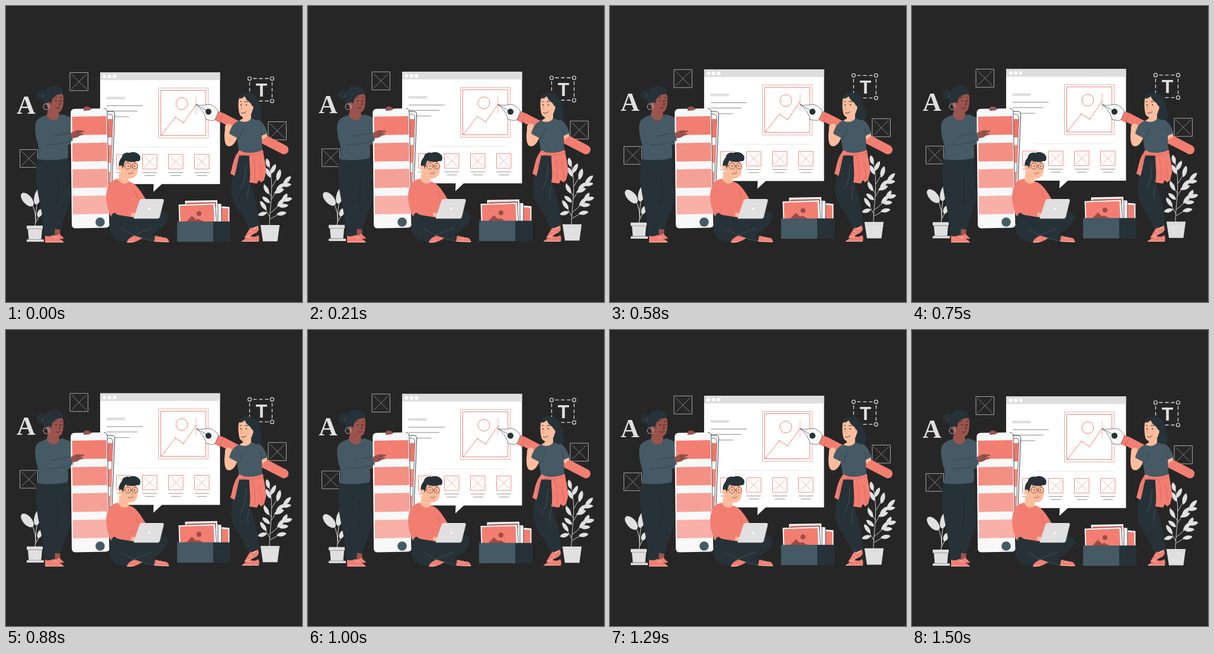
Animation of 500x500 px, one loop 1.54 s. Source, as an HTML page with a canvas:

```html
<!DOCTYPE html>
<html lang="en">
<head>
<meta charset="utf-8">
<title>Design team</title>
<style>
html, body { margin: 0; width: 100%; height: 100%; overflow: hidden; background: #262626; }
canvas { display: block; width: 500px; height: 500px; }
</style>
</head>
<body>
<canvas id="stage" width="500" height="500"></canvas>
<script>
const ctx = document.getElementById('stage').getContext('2d');
const LOOP = 1540, LIFT = 5.8, LEAD = 25;
const BG = '#262626', CORAL = '#f27e71', DEEP = '#d9675c', NAVY = '#263238', SLATE = '#455a64';
const GREY = '#e0e0e0', PALE = '#f8f8f8', WHITE = '#ffffff', TAN = '#fdbd9d', BROWN = '#9a544d', INK = '#1c262b';

const fill = (color, d) => { ctx.fillStyle = color; ctx.fill(new Path2D(d)); };
const line = (color, width, d) => {
  ctx.strokeStyle = color;
  ctx.lineWidth = width;
  ctx.stroke(new Path2D(d));
};
const rect = (color, x, y, w, h) => { ctx.fillStyle = color; ctx.fillRect(x, y, w, h); };
const oval = (color, x, y, rx, ry = rx, turn = 0) => {
  ctx.fillStyle = color;
  ctx.beginPath();
  ctx.ellipse(x, y, rx, ry, turn, 0, Math.PI * 2);
  ctx.fill();
};
const ring = (color, width, x, y, r) => {
  ctx.strokeStyle = color;
  ctx.lineWidth = width;
  ctx.beginPath();
  ctx.arc(x, y, r, 0, Math.PI * 2);
  ctx.stroke();
};
const text = (str, font, x, y) => {
  ctx.font = font;
  ctx.fillStyle = GREY;
  ctx.textAlign = 'center';
  ctx.fillText(str, x, y);
};

function crossBox(color, x, y, size, width = 0.9) {
  const a = 3, b = size - 3;
  line(color, width, `M${x} ${y}h${size}v${size}h${-size}z`);
  line(color, width * 0.75, `M${x + a} ${y + a}L${x + b} ${y + b}M${x + b} ${y + a}L${x + a} ${y + b}`);
}

// A pointed leaf growing from (x, y) in the given direction, in degrees.
function leaf(x, y, length, width, degrees) {
  ctx.save();
  ctx.translate(x, y);
  ctx.rotate(degrees * Math.PI / 180);
  fill(GREY, `M0 0C${length * 0.3} ${-width} ${length * 0.8} ${-width * 0.8} ${length} 0` +
    `C${length * 0.8} ${width * 0.8} ${length * 0.3} ${width} 0 0`);
  ctx.restore();
}

function drawWindow() {
  rect(WHITE, 159, 112.2, 202.5, 188.6);
  fill(WHITE, 'M249.5 300L249 314L264 300z');
  rect('#dedede', 159, 112.2, 202.5, 13);
  for (const x of [166.5, 175, 183.5]) oval(WHITE, x, 119, 3);

  rect('#dedede', 169.5, 153.3, 31.5, 4.4);
  line('#6b6b6b', 0.8, 'M170 168.5H231M170 177.5H222M170 187H208');
  line('#dddddd', 0.7, 'M204 238.6H341');

  line('#d99b94', 0.8, 'M257.5 138.6h84v84.4h-84z');
  line(CORAL, 1, 'M261.3 142.5h76.4v76.2h-76.4z');
  ring(CORAL, 1, 297, 165, 10);
  line(CORAL, 1, 'M262.5 218L286 188L300 197L321 167');
  line(CORAL, 0.6, 'M321 153V183');
  for (const [x, y] of [[263, 217.5], [286, 188], [300, 197], [321, 167]]) oval(CORAL, x, y, 0.9);

  for (let i = 0; i < 4; i++) {
    const x = 186.5 + i * 44;
    crossBox(CORAL, x, 250.8, 24.5, 0.9);
    line('#777777', 0.8, `M${x} 281.4h24.5M${x + 4} 286.5h17`);
  }
}

function drawSymbols() {
  crossBox('#b5b5b5', 108, 112.5, 30.5);
  crossBox('#b5b5b5', 23.5, 242.5, 30);
  crossBox('#b5b5b5', 443, 195.5, 30.5);
  text('A', 'bold 44px "Liberation Serif", serif', 33.8, 182.3);

  ctx.setLineDash([6, 4]);
  ctx.lineDashOffset = 4;
  line(GREY, 1.3, 'M411.5 122.5H449.5M449.5 122.5V160.5M411.5 160.5H449.5M411.5 122.5V160.5');
  ctx.setLineDash([]);
  for (const [x, y] of [[411.5, 122.5], [449.5, 122.5], [449.5, 160.5]]) {
    oval(BG, x, y, 3);
    ring(GREY, 1.2, x, y, 3);
  }
  text('T', 'bold 32px "Liberation Sans", sans-serif', 431.5, 153);
}

function drawPlants() {
  line(GREY, 1, 'M49 372C52 356 48 344 44 335M50 362Q50 344 53 332M50 366L57 353');
  oval(GREY, 36, 327, 14, 7.5, 0.84);
  oval(GREY, 54, 321.5, 14, 6, -1.3);
  oval(GREY, 57, 350, 7, 4, -1.2);
  rect(GREY, 35, 371, 27, 5.5);
  fill(GREY, 'M37 377H61L59.5 394H38.5z');
  rect(GREY, 35, 394.5, 29, 3.7);
  line('#bdbdbd', 0.6, 'M36 376.7H62M36 394.2H62');

  line(GREY, 0.9, 'M445 371C445 340 454 306 444 266M446 350Q460 340 476 320M448 327Q462 302 478 296' +
    'M446 357Q436 340 431 330M448 322Q440 308 436 300M446 360Q458 352 468 350M449 306Q456 294 460 288');
  const leaves = [
    [444, 273, 16, 5, -103], [447, 284, 19, 5, -63], [447, 290, 18, 5, -116],
    [458, 295, 20, 5.5, -75], [456, 312, 19, 5, -42], [468, 301, 19, 5, -45],
    [464, 303, 18, 5, -5], [453, 316, 18, 5, -22], [466, 332, 18, 5, -60],
    [468, 329, 16, 5, -15], [458, 339, 20, 5, -49], [460, 338, 17, 5, -4],
    [457, 352, 17, 5, -10], [440, 345, 19, 5, -124], [441, 349, 16, 5, 165],
    [444, 318, 18, 5, -118], [446, 333, 17, 5, -140]
  ];
  for (const shape of leaves) leaf(...shape);
  fill(GREY, 'M429.8 370H462.2L458.5 397.6H434z');
  line('#c8c8c8', 0.6, 'M431 374H461');
}

function drawPhotoBox() {
  fill(PALE, 'M361 338L377.5 339.5V366H361z');
  fill(CORAL, 'M363 341L375.5 342V366H363z');
  fill(PALE, 'M353 333.4L364 334.5V366H353z');
  line(NAVY, 0.8, 'M358 333.5V366M364 334.5V366');
  fill(PALE, 'M302.5 329L357 328V366H303z');
  fill(CORAL, 'M305 332L355 331V340H305z');
  fill(PALE, 'M291.5 335.2L353.5 333L356 366H292.5z');
  fill(CORAL, 'M293.5 337.4L350.5 335.6L352 366H294.5z');
  line(NAVY, 0.7, 'M291.5 335L353.5 332.7L355.5 364');
  oval('#9b4c46', 326, 350.6, 4.2);
  fill('#9b4c46', 'M304 365L314 354.5L321 361L325 359.5L335 365z');
  rect(SLATE, 289, 364, 61, 34.3);
  rect(NAVY, 350, 364, 29, 34.3);
}

function drawPen() {
  ctx.lineCap = 'round';
  line(CORAL, 15.6, 'M364 188L469.5 242.6');
  ctx.lineCap = 'butt';
  fill(CORAL, 'M358.5 177.5L369 182L361 197L352 192.5z');
  line(DEEP, 1, 'M367.5 181L360.5 196');
  const nib = 'M321 166.5C333 170 342 164 348 167.5C355 172 360 176 358 181L353.5 191C351 195 344 193 338 191.5C335 180 329 173 321 166.5z';
  fill(PALE, nib);
  line(NAVY, 0.6, nib + 'M321 166.5L340 177');
  oval(NAVY, 342, 178.6, 5.1);
}

function drawLeftWoman() {
  fill(BROWN, 'M79 375L92 375L91 389L78 390z');
  fill(CORAL, 'M80 387C85 389 88 386 90 384C92 388 96 389 98 393L80 394z');
  fill(NAVY, 'M54 254H105C109 280 104 294 109 318C108 340 98 354 92 378L80 376C80 358 86 342 86 330L82 389H64.5C64 354 55 330 52 302C50 285 51 270 54 254z');
  line(INK, 0.8, 'M86 285C90 300 88 318 86 335');
  fill(CORAL, 'M66 388C73 391 78 387 81 387C85 392 94 393 98 399.5H66z');
  line('#f8d6d2', 0.8, 'M66 398.6H97M80 391L85 388.5M83 393L88 390.5');

  fill(SLATE, 'M70 184C80 190 88 186 94 183C103 185 109 188 114 192V232L104 235C106 245 105 254 104 257C88 261 69 261 54 259C56 246 56 237 52 227C49 214 48 202 51 195C56 188 63 186 70 184z');
  fill(BROWN, 'M72 170L89 176L90 185C87 196 73 196 69 184z');

  oval(NAVY, 59, 149.5, 7.5, 8.2, 0.5);
  oval(CORAL, 64, 151, 1.8, 4, 0.4);
  fill(BROWN, 'M73 160C76 150 83 146 89 146C95 146 97 150 97 157C97 167 96 174 92 178C87 182 78 179 74 173z');
  fill(NAVY, 'M71 172C65 168 62 164 62 156C62 143 71 135 81 135C91 134 97 141 96.5 149C88 148 81 152 78 158C77 163 76 166 74 168z');
  oval(BROWN, 72.5, 167.5, 4, 5);
  ring(GREY, 0.8, 68, 170, 5);
  line('#42231f', 0.9, 'M81 155Q84 153 86 154M91 154L95 155M90 159L92 167L89 167M84 172Q89 174 92 171');
  oval('#2b1b1a', 84.5, 160, 0.9, 1.3);
  oval('#2b1b1a', 93.5, 160, 0.8, 1.2);
}

function drawSwatchCards() {
  fill(PALE, 'M165 178H178Q184 178 183.7 184L177 350L160 372z');
  line(NAVY, 0.9, 'M169 178H178Q184 178 183.7 184L177 350');
  line(NAVY, 0.7, 'M172 183Q181 181 180.5 190L174 360');
  fill('#e9776b', 'M172 191H180.3L179.6 222H172z');
  fill('#ef887c', 'M172 235H179.5L178.2 265H172z');
  fill('#f3988e', 'M172 280H177.7L176.4 310H172z');

  fill(PALE, 'M116 173.8L165 173Q170.8 173 171 179L174.8 368Q175 374.4 168 374.6L118 375.4Q111.3 375.4 111.1 369.4L109.2 181Q109.2 174 116 173.8z');
  line(NAVY, 0.8, 'M165 173Q170.8 173 171 179L174.8 368');
  fill('#f27e71', 'M111.6 187L169.5 186L170.2 217.2L112 218z');
  fill('#f48f84', 'M112 231.7L170.4 230.7L171 262L112.3 262.8z');
  fill('#f6a198', 'M112.4 276L171.3 275L172 306.5L112.7 307.5z');
  fill('#f8b0a9', 'M112.8 321L172.2 320L173 351L113 352z');
  oval(SLATE, 159, 365, 7.8);

  fill(BROWN, 'M131 173C132 169 138 169 141 171L145 174L140 176.5L131 177z');
  fill(SLATE, 'M59 222C73 219 92 217 109 214L113 226C102 231 80 235 66 234C59 234 55 228 59 222z');
  line('#2f4049', 0.8, 'M78 220L109 214M66 234Q90 235 113 227');
  fill(BROWN, 'M109 215C115 211 120 209 125 210L132 210.5Q133 213 129 213.5L124 214L131 216Q130 219 125 218.5Q121 223 112 223.5z');
  line('#5b302c', 0.6, 'M118 213L127 213.5M119 217L126 218');
}

function drawMan() {
  fill(CORAL, 'M182 294C190 290 201 293 209 297C219 300 225 308 237 328L216 358L178 357C172 345 166 325 171 309C173 301 177 296 182 294z');
  line(DEEP, 0.9, 'M186 320C187 333 193 343 199 348M218 312L223 326');
  fill(TAN, 'M192 279L207 289L207 297C202 302 194 301 190 293z');
  fill(TAN, 'M194 267C197 259 207 256 217 260C223 263 224 272 222 281C220 289 213 293 206 291C200 289 195 283 194 278z');
  fill(NAVY, 'M192 276C189 266 191 261 196 255C196 249 204 246 209 248C217 244 227 250 227 256C227 261 225 263 222 262C215 264 207 264 202 261C199 265 199 270 197 276z');
  oval(TAN, 193.5, 274, 3.5, 4.5);
  const frames = '#6d3b38';
  ring(frames, 0.8, 206, 270.5, 5.2);
  ring(frames, 0.8, 218, 270.5, 4.7);
  line(frames, 0.8, 'M194 269L201 270M211 270H213.5M203 263.5L208 262.5M215 263L219 264M206 282Q211 285 215 281');
  line('#d98a70', 0.8, 'M212 271L214 278L211 278.5');
  oval(NAVY, 206.5, 270.5, 0.9);
  oval(NAVY, 217, 270.5, 0.9);

  fill(NAVY, 'M181 350C189 347 202 352 218 357L259 347C268 346 275 350 274 358C272 369 259 379 247 386L254 390L250 398C239 397 225 393 216 389L207 397C191 401 174 391 175 374C175 362 177 354 181 350z');
  line('#53646c', 0.6, 'M196 376C208 385 232 394 250 397M214 388L246 375');
  fill(CORAL, 'M204 399.5C205 394 211 390 217 388L230 392C224 397 213 401 204 399.5z');
  fill(CORAL, 'M252 388C257 388 261 392 267 391C272 391 275 394 275.5 399L250 398z');
  line('#f9d9d4', 0.8, 'M251 397.5L275 398.5M205 399L217 398M258 392L263 389.5M262 394L266 391');

  fill(CORAL, 'M171 318C174 333 180 350 190 353L215 357L219 350L201 342L187 321z');
  fill(TAN, 'M211 350C216 348 220 350 222 356L212 356z');
  fill(GREY, 'M226 327.5Q227 326 229 326L264 326Q267 326 266.5 328.5L259.5 357Q258.5 359 256 359H217Q215 359 216 356.5z');
  line('#b6b6b6', 0.7, 'M216 359H256Q258.5 359 259.5 357L266.5 328.5');
  oval(WHITE, 242, 342.5, 1.8);
}

function drawRightWoman() {
  fill(TAN, 'M412 376L423 368L426 378L415 386z');
  fill(NAVY, 'M411 290L386 252L413 249C413 270 410 288 414 305C422 324 426 349 428 370L410 378C405 362 397 348 389 339C382 327 379 316 381 301C382 285 386 270 387 250z');
  line('#4c5d66', 0.7, 'M405 268C405 290 401 302 395 310M411 303C408 312 408 320 409 327');
  fill(CORAL, 'M403 390C407 385 409 378 414 374C417 379 422 377 425 370C427 374 428 378 425 381C417 384 412 391 403 392z');
  fill(CORAL, 'M397.5 398C402 394 406 392 411 387C417 391 422 390 426 387C428 390 428 394 427 397.5z');
  line('#f9d9d4', 0.8, 'M398 397.5H427M404 391L424 382M409 390L413 392M412 380L416 382');

  // Hair behind the neck, then shirt, arms and face.
  fill(NAVY, 'M400 147C409 144 421 148 425 157C429 167 433 177 431 190C426 197 413 196 408 188L399 165z');
  fill(TAN, 'M431 214L441 213L441 220L433 226z');
  fill(SLATE, 'M389 196C396 192 403 190 410 190L424 191C433 194 438 203 442 215L432 219L433 246C420 250 403 249 393 245C393 236 390 229 390 220L381 216C381 207 384 200 389 196z');
  fill(TAN, 'M370 207C369 200 375 197 380 200C383 203 380 207 379 212L383 218L391 220C389 229 383 237 377 237C370 237 369 228 369 218z');
  fill(SLATE, 'M389 196C382 201 379 208 377 215L394 224L402 207z');
  line('#2f4049', 0.8, 'M401 206L394 224L378 216M430 207L433 219');
  fill(TAN, 'M400 180L414 178L414 190C409 197 401 197 394 193.5L400 190z');
  fill(TAN, 'M394 154C401 150 411 153 417 162C419 173 416 183 409 187C403 190 396 188 394 181C392 171 392 161 394 154z');
  fill(NAVY, 'M393 156C393 149 402 144 411 147C421 148 426 157 427 167C429 176 434 184 431 191C424 195 417 192 414 186C418 178 417 168 412 163C407 160 405 156 403 152C401 155 398 157 393 156z');
  oval(TAN, 415, 172, 2.7, 4);
  line(NAVY, 0.9, 'M395 162L398 161M403 162Q406 160 409 162M397 180Q402 183 406 178');
  line('#d98a70', 0.8, 'M399 167L397 174L400 175');
  oval(NAVY, 397, 167, 0.8, 1.2);
  oval(NAVY, 406, 167, 0.9, 1.2);

  fill(CORAL, 'M393 244C405 250 421 249 434 243C435 254 439 266 439.5 280L436 294L431 298L427 294L424 300L411 298C414 285 411 267 411 253L393 252z');
  fill(CORAL, 'M397 246C392 254 391 270 386 287L379 283C383 272 383 260 391 248z');
  oval(CORAL, 396, 248.5, 4.5, 4, 0.3);
  line(DEEP, 0.9, 'M399 250Q416 254 434 248M416 253C422 266 420 280 421 294M429 262C428 272 433 280 432 292M392 249L387 274');
}

function draw(time) {
  const phase = (time + LEAD) / LOOP * Math.PI * 2;
  ctx.fillStyle = BG;
  ctx.fillRect(0, 0, 500, 500);

  ctx.save();
  ctx.translate(0, -LIFT * (1 - Math.cos(phase)) / 2);
  drawWindow();
  drawSymbols();
  drawPlants();
  drawPhotoBox();
  ctx.restore();

  drawLeftWoman();
  drawSwatchCards();
  drawMan();
  drawPen();
  drawRightWoman();
}

const start = performance.now();
function tick() {
  draw((performance.now() - start) % LOOP);
  requestAnimationFrame(tick);
}
tick();
</script>
</body>
</html>
```
